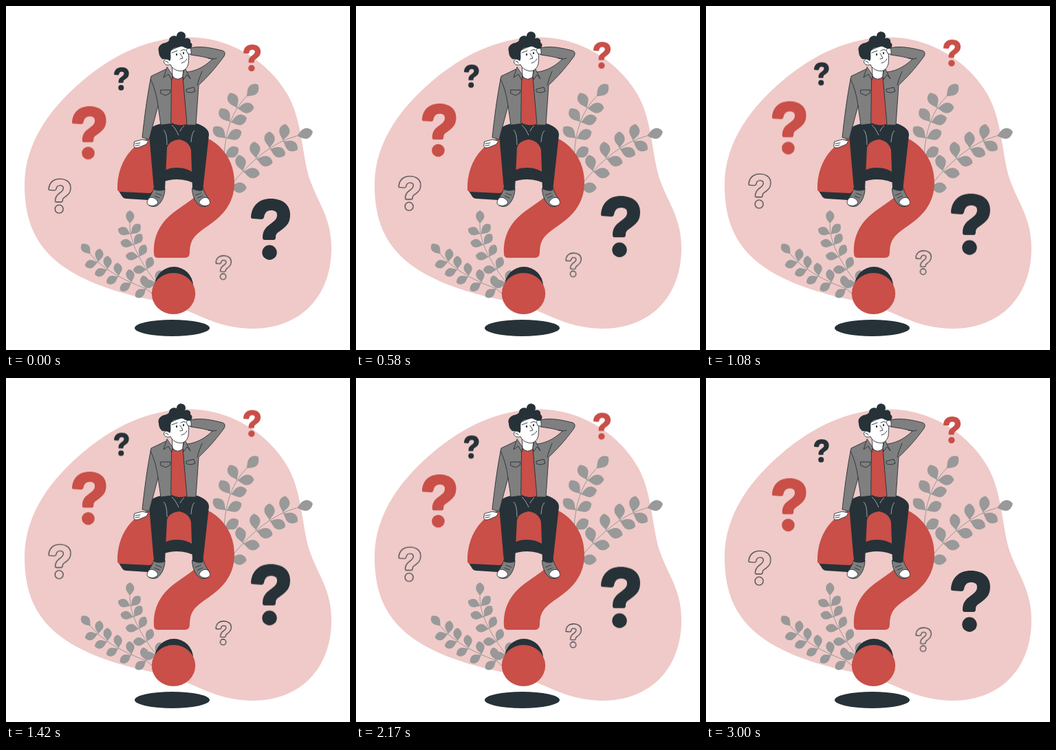
An HTML page for the animation above (3.04 s loop, 500 px wide and 500 px high).

```html
<!DOCTYPE html>
<html lang="en">
<head>
<meta charset="utf-8">
<title>Questions</title>
<style>
  html, body { margin: 0; width: 100%; height: 100%; overflow: hidden; background: #fff; }
  svg { display: block; width: 100vw; height: 100vh; }
  .red { fill: #c94f48; }
  .dark { fill: #263238; }
  .grey { fill: #7f7f7f; }
  .white { fill: #fff; }
  .line { stroke: #263238; stroke-width: .9; stroke-linejoin: round; stroke-linecap: round; }
  .open { fill: none; }
  .outline { fill: none; stroke: #263238; stroke-width: 1.1; }
  #mark * { vector-effect: non-scaling-stroke; }
  #leaves { fill: #999; }
  #leaves .stem { fill: none; stroke: #999; }
  .float { animation: float 3.04s linear infinite; }
  /* 3 s of travel, then a short rest */
  @keyframes float {
    0%, 98.684%, 100% { transform: translateY(0); }
    49.342% { transform: translateY(-10px); }
  }
</style>
</head>
<body>
<svg viewBox="0 0 500 500">
  <defs>
    <g id="mark">
      <path d="M0 27C1 10 12 0 29 0C46 0 57 9 57 23C57 34 53 39 45 45C38 50 36 51 36 56Q36 60 33 60H20Q17 60 17 57C17 47 21 42 28 37C35 32 38 29 38 24C38 19 35 17 29 17C23 17 20 21 19 27Q18 30 15 30L2 29Q0 29 0 27Z"/>
      <circle cx="27" cy="78.200" r="10.700"/>
    </g>
    <path id="leaf" d="M0 0C5-1 8-8 16-8C21-8 25-4 26 0C24 4 20 8 15 8C9 8 5 2 0 0Z"/>
  </defs>

  <path fill="#efcac8" d="M27 260C27 195 70 143 112 108C155 72 205 46 265 45.500C330 45 385 85 410 130C432 170 430 222 443 256C456 290 473 310 473 352C473 420 430 469 358 469C300 468 275 442 225 430C70 400 27 346 27 260Z"/>
  <g id="leaves"></g>

  <g class="float">
    <use class="dark" href="#mark" transform="translate(356 280)"/>
    <use class="red" href="#mark" transform="translate(96 145.700) scale(.87)"/>
    <use class="red" href="#mark" transform="translate(345 56) scale(.44)"/>
    <use class="dark" href="#mark" transform="translate(157 89) scale(.38)"/>
    <g class="outline">
      <use href="#mark" transform="translate(62 251.300) scale(.56)"/>
      <use href="#mark" transform="translate(305 362.800) scale(.39)"/>
    </g>
  </g>

  <ellipse class="dark" cx="241.500" cy="468" rx="54.500" ry="12"/>
  <ellipse class="dark" cx="244" cy="407" rx="28" ry="28"/>
  <ellipse class="red" cx="243.500" cy="418" rx="31.700" ry="30"/>

  <!-- seat -->
  <path class="dark" d="M162 266L169 277Q171 280 175 280L206 282Q209 282 210 279L214 269ZM224 240C240 230 264 231 278 246V260C262 251 244 249 224 257Z"/>
  <path class="red" d="M162 267C161 222 190 185 247 183C300 181 332 215 332 256C332 290 312 307 290 322C272 335 268 340 267 358Q267 366 260 366H221Q215 366 215 360C214 340 220 320 240 303C262 285 282 278 282 262C282 248 270 235 248 235C228 235 216 248 214 266Q213 272 208 272L166 270Q162 269 162 267Z"/>

  <!-- shoes and trousers -->
  <g id="shoe" class="line">
    <path class="grey" d="M215 264L231 265C231 276 226 286 220 290C215 293 206 291 206 287C205 280 213 274 215 264Z"/>
    <path class="white" d="M207 280C211 276 219 279 221 286Q216 292 209 290T207 280Z"/>
    <path class="open" d="M216 276L223 279M218 272L226 275"/>
  </g>
  <use href="#shoe" transform="matrix(-1 0 0 1 501.500 0)"/>
  <path class="dark" d="M208 186C207 178 213 174 225 171H278C289 175 295 180 295 187L286 268Q279 270 271 266L269 210C268 202 262 196 252 194C242 195 236 199 234 206L231 267Q223 270 215 267Z"/>
  <path class="open" stroke="#fff" stroke-width=".55" d="M241 173Q246 177 251 188M259 174Q255 177 253 182M229 180Q234 184 234 202M274 181Q270 184 269 198"/>

  <!-- hand, jacket, shirt -->
  <g class="line">
    <path class="white" d="M187 197L198 194L207 196L204 201L192 206H187Q185 204 186 201Z"/>
    <path class="open" d="M188 200L195 199M188 203L194 202"/>
    <path class="grey" d="M268 61C284 57 303 62 315 65Q320 67 317 73C304 91 292 104 280 115L276 173H262L257 105L263 96C280 94 292 85 300 77Q285 73 269 71Z"/>
    <path class="grey" d="M232 92L211 102C205 131 201 164 198 191L208 194L221 145L225 173L241 171L243 104Z"/>
    <path class="red" d="M241 103Q249 108 257 103L263 172Q251 176 240 170Z"/>
    <path class="white" d="M241 84L242 102Q249 110 257 103L258 88Z"/>
    <path class="grey" d="M234 89L229 104L236 99L241 108L242 101ZM260 90L268 106L263 100L258 107L257 101Z"/>
    <path class="open" d="M210 106Q218 122 221 145M285 95Q280 106 278 115M306 76Q301 78 294 76M225 122H239L238 127L232 130L225 127ZM262 121L273 118L275 124L269 126L263 125Z"/>
  </g>

  <!-- head -->
  <g class="line">
    <path class="white" d="M238 65L262 54C266 61 266 73 265 84C263 92 257 96 250 94Q242 92 239 85C233 88 228 83 230 79Q233 75 238 78Z"/>
    <path class="white" d="M264 69L262 64L266 59Q270 62 269 70Z"/>
  </g>
  <path class="dark" d="M238 80C233 75 228 79 226 76Q222 72 222 66C220 60 224 56 229 54Q235 53 237 50C237 44 244 42 248 44C248 37 256 35 260 40Q262 44 260 47C266 45 269 49 268 53C272 55 271 61 267 62C261 63 258 58 254 59C249 61 244 59 240 65C238 69 241 76 238 80Z"/>
  <path class="line open" d="M241 68L249 65M254 65Q258 62 261 64M253 69Q256 73 257 76L253 77M255 83Q260 82 263 77M232 80Q235 80 236 83"/>
  <ellipse class="dark" cx="248" cy="70.500" rx="1.100" ry="1.700"/>
  <ellipse class="dark" cx="258" cy="68.500" rx="1.100" ry="1.700"/>
</svg>
<script>
  const SPREAD = 56; // degrees between a leaf and its stem

  const leaf = (p, angle, size) =>
    `<use href="#leaf" transform="translate(${p}) rotate(${angle}) scale(${size})"/>`;

  // A curved stem from tip to root: one leaf on the tip, then evenly spaced pairs
  function branch(tip, bend, root, pairs, size) {
    let out = `<path class="stem" d="M${tip}Q${bend} ${root}"/>`;
    for (let i = 0; i <= pairs; i++) {
      const t = i / pairs, u = 1 - t;
      const point = [0, 1].map(k => u * u * tip[k] + 2 * u * t * bend[k] + t * t * root[k]);
      const [dx, dy] = [0, 1].map(k => u * (tip[k] - bend[k]) + t * (bend[k] - root[k]));
      const angle = Math.atan2(dy, dx) * 180 / Math.PI;
      const turns = i ? [-SPREAD, SPREAD] : [0];
      out += turns.map(turn => leaf(point, angle + turn, size)).join("");
    }
    return out;
  }

  document.getElementById("leaves").innerHTML =
    branch([349, 132], [319, 162], [317, 220], 4, .95) +
    branch([422, 189], [373, 202], [325, 263], 5, .95) +
    branch([180, 317], [179, 352], [219, 403], 5, .76) +
    branch([123, 361], [147, 390], [204, 411], 5, .76) +
    `<path class="stem" d="M204 411L218 423M219 403L228 420"/>`;
</script>
</body>
</html>
```
